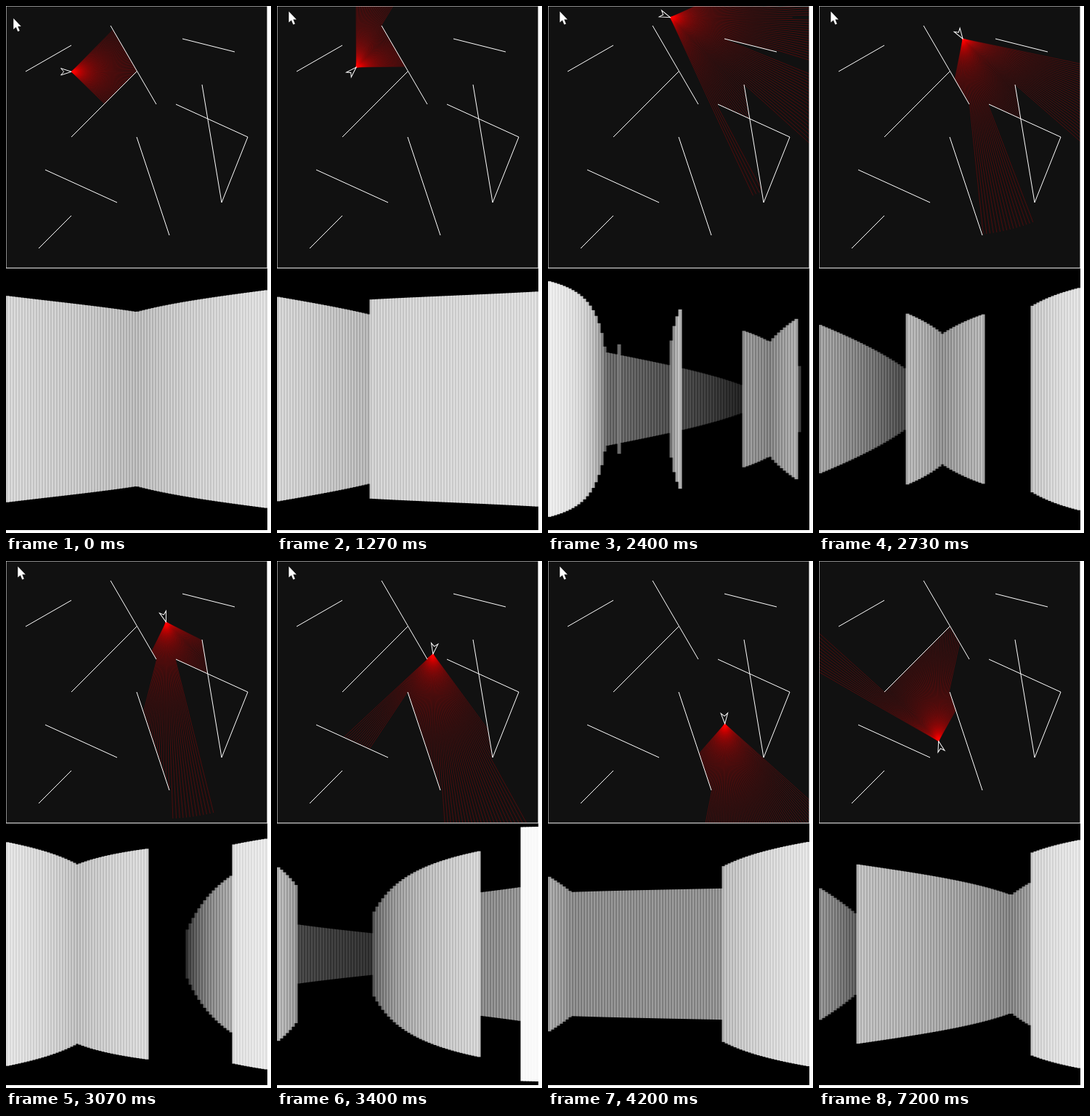
An HTML page with a canvas that plays this animation: 365x724 px, repeating every 8000 ms.

```html
<!DOCTYPE html>
<html lang="en">
<head>
<meta charset="utf-8">
<title>Ray casting</title>
<style>
html, body { margin: 0; width: 100%; height: 100%; overflow: hidden; background: #fff; }
canvas { display: block; }
</style>
</head>
<body>
<canvas id="view" width="360" height="720"></canvas>
<script>
const ctx = document.getElementById('view').getContext('2d');
const SIZE = 360, RANGE = 270, RAYS = 90, COL = SIZE / RAYS;
const LOOP = 8000, SPEED = 2.25, TURN = 3;
const FIRST = 15, DRIVE = 48, CUT = 108; // steps of 1/15 s
const TICKS = 4; // ticks of driving per step
const rad = deg => deg * Math.PI / 180;

// Corners of each wall, in units of 9 px.
const walls = [
  'M0 0 40 0 40 40 0 40 0 0', '3 10 10 6', '16 3 23 15', '20 10 10 20', '27 5 35 7',
  '26 15 37 20 33 30 30 12', '20 20 25 35', '6 25 17 30', '5 37 10 32'
].flatMap(chain => {
  const v = chain.match(/\d+/g).map(n => n * 9), parts = [];
  for (let i = 0; i + 3 < v.length; i += 2) parts.push(v.slice(i, i + 4));
  return parts;
});

// From each tick on, steer towards a heading; go forward while the key is held.
const steering = { 1: -69, 54: 21, 86: 57, 118: 72, 124: 108, 141: 78, 156: 57, 164: 69, 184: 87 };
const forward = [[2, 11], [34, 78], [85, 163], [164, 190]];

function drive() {
  let x = 90.1, y = 90.3, dir = 0, goal = 0;
  const path = [{ x, y, dir }];
  for (let tick = 0; tick < DRIVE * TICKS; tick++) {
    goal = steering[tick] ?? goal;
    dir += TURN * Math.sign(goal - dir);
    if (forward.some(([from, to]) => tick >= from && tick < to)) {
      x += SPEED * Math.cos(rad(dir));
      y += SPEED * Math.sin(rad(dir));
    }
    path.push({ x, y, dir });
  }
  return path;
}

const path = drive();
const lastPose = { x: 164.7, y: 247.5, dir: 255 };

function poseAt(step) {
  if (step >= CUT) return lastPose;
  return path[TICKS * Math.min(DRIVE, Math.max(0, step - FIRST))];
}

function cast(p, dx, dy) {
  let best = Infinity;
  const flat = Math.abs(dy) < 1e-9; // level rays also see walls behind
  for (const [ax, ay, bx, by] of walls) {
    const ex = bx - ax, ey = by - ay, qx = ax - p.x, qy = ay - p.y;
    const den = dx * ey - dy * ex;
    if (Math.abs(den) < 1e-9) continue;
    const t = (qx * ey - qy * ex) / den;
    const u = (qx * dy - qy * dx) / den;
    if (u > 0 && u < 1 && (t > 0 || flat)) best = Math.min(best, Math.abs(t));
  }
  return best;
}

function line(x1, y1, x2, y2) {
  ctx.beginPath();
  ctx.moveTo(x1, y1);
  ctx.lineTo(x2, y2);
  ctx.stroke();
}

function polygon(points) {
  ctx.beginPath();
  for (const [x, y] of points) ctx.lineTo(x, y);
  ctx.closePath();
}

function drawRays(p) {
  ctx.strokeStyle = 'rgba(255,0,0,0.25)';
  for (let i = 0; i < RAYS; i++) {
    const rel = i - RAYS / 2, a = rad(p.dir + rel);
    const dx = Math.cos(a), dy = Math.sin(a);
    const hit = cast(p, dx, dy), len = Math.min(hit, RANGE);
    line(p.x, p.y, p.x + dx * len, p.y + dy * len);
    if (hit > RANGE) continue;
    const near = 1 - hit * Math.cos(rad(rel)) / RANGE;
    const h = SIZE * near;
    ctx.fillStyle = `rgba(255,255,255,${near})`;
    ctx.fillRect(i * COL - 0.5, SIZE * 1.5 - h / 2, COL + 1, h);
  }
}

function drawShip(p) {
  ctx.save();
  ctx.translate(p.x, p.y);
  ctx.rotate(rad(p.dir));
  polygon([[0, 0], [-14.5, -4.7], [-10.5, 0], [-14.5, 4.7]]);
  ctx.stroke();
  ctx.restore();
}

function drawPointer(step) {
  if (step >= CUT) return;
  const moved = Math.min(1, Math.max(0, (step - 6) / 2));
  ctx.save();
  ctx.translate(10.3 + 6 * moved, 17 - 9.5 * moved);
  polygon([[0, 0], [0, 15], [3.5, 12], [6, 18], [8.5, 17], [6, 11], [10.5, 11]]);
  ctx.fillStyle = '#fff';
  ctx.fill();
  ctx.restore();
}

function draw(time) {
  // Steps begin on whole hundredths of a second.
  const step = Math.floor((Math.floor(time / 10) + 0.4) * 0.15);
  const p = poseAt(step);
  ctx.fillStyle = '#000';
  ctx.fillRect(0, SIZE, SIZE, SIZE);
  ctx.fillStyle = '#111';
  ctx.fillRect(0, 0, SIZE, SIZE);
  drawRays(p);
  ctx.strokeStyle = '#fff';
  for (const w of walls) line(...w);
  drawShip(p);
  drawPointer(step);
}

const start = performance.now();
function tick() {
  draw((performance.now() - start) % LOOP);
  requestAnimationFrame(tick);
}
tick();
</script>
</body>
</html>
```
